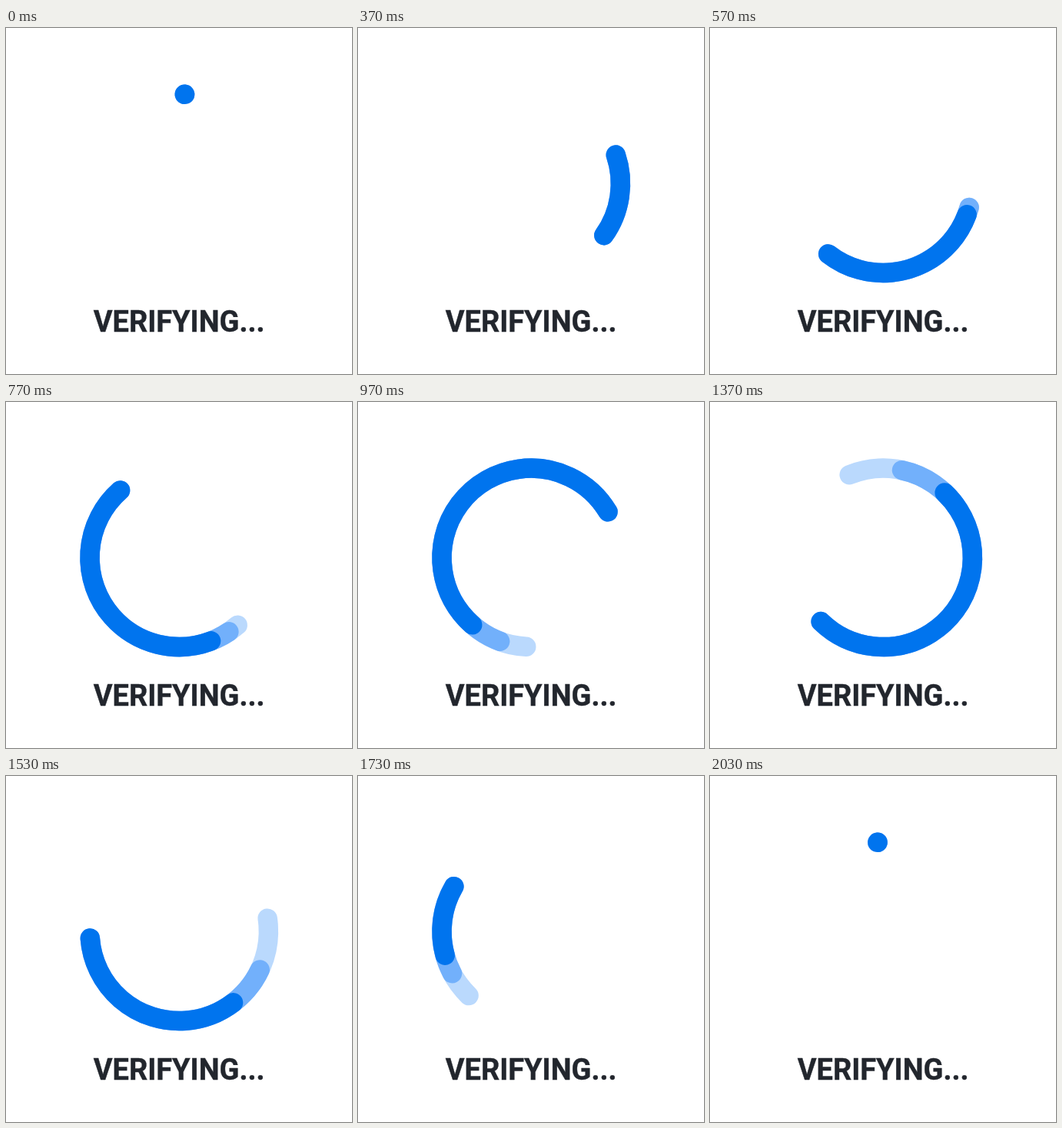
Recreate the animation shown at these times as an HTML page. Size 450 px wide and 450 px high, loop 2.06 s.

```html
<!DOCTYPE html>
<html lang="en">
<head>
<meta charset="utf-8">
<title>Verifying</title>
<style>
  html, body { margin: 0; height: 100%; overflow: hidden; background: #fff; }
  svg { display: block; width: 100vw; height: 100vh; }
  circle { fill: none; stroke-width: 25.5; stroke-linecap: round; }
  text { font: 700 38px Roboto, Arial, sans-serif; fill: #22262d; stroke: #22262d; stroke-width: 0.4px; }
</style>
</head>
<body>
<svg viewBox="0 0 450 450">
  <g id="ring">
    <circle r="116.2" pathLength="360" stroke="#bad9fd"/>
    <circle r="116.2" pathLength="360" stroke="#72b0fb"/>
    <circle r="116.2" pathLength="360" stroke="#0074ee"/>
  </g>
  <text x="113.7" y="395">VERIFYING...</text>
</svg>
<script>
  const LOOP = 2060, STEPS = 62;
  const ring = document.getElementById('ring');
  const arcs = [...ring.children];
  const tailStarts = [22, 16.5, 11]; // in steps, palest arc first

  // Cubic Bezier easing, solved by bisection
  function bezier(x1, y1, x2, y2) {
    const at = (u, a, b) => 3 * u * (1 - u) ** 2 * a + 3 * u * u * (1 - u) * b + u ** 3;
    return x => {
      let lo = 0, hi = 1;
      for (let i = 0; i < 30; i++) {
        const mid = (lo + hi) / 2;
        if (at(mid, x1, x2) < x) lo = mid; else hi = mid;
      }
      return at(lo, y1, y2);
    };
  }

  const spin = bezier(0.2, 0.244, 0.8, 0.756);
  const headEase = bezier(1 / 3, 0, 2 / 3, 1);
  const tailEase = bezier(0.65, 0, 2 / 3, 1);
  const progress = (pos, from, to) => Math.min(1, Math.max(0, (pos - from) / (to - from)));

  function draw(now) {
    // 30 steps a second, with changes on multiples of 10 ms
    const tick = Math.floor((now % LOOP) / 10);
    const pos = Math.floor((tick + 0.5) * 0.3) + 0.5;
    const head = 360 * headEase(progress(pos, 0, 47));

    ring.setAttribute('transform', `translate(225.2 202.3) rotate(${360 * spin(pos / STEPS) - 90})`);
    arcs.forEach((arc, i) => {
      const tail = 360 * tailEase(progress(pos, tailStarts[i], STEPS));
      arc.setAttribute('stroke-dasharray', `${Math.max(0.02, head - tail)} 720`);
      arc.setAttribute('stroke-dashoffset', -tail);
    });
  }

  function loop() {
    draw(performance.now());
    requestAnimationFrame(loop);
  }
  loop();
</script>
</body>
</html>
```
